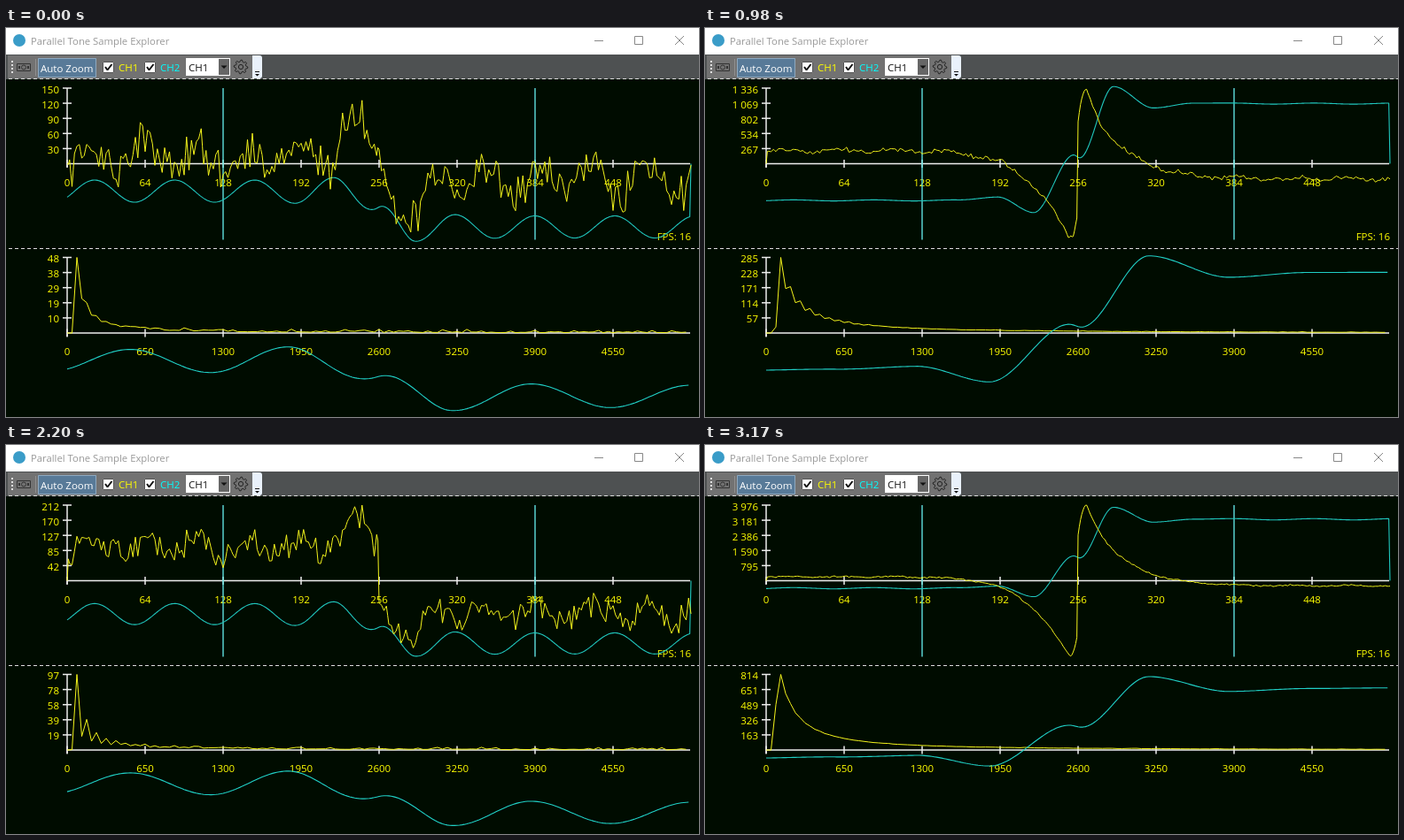
These frames come from a looping animation (782x440 px, 3270 ms). An HTML page with a canvas:

```html
<!DOCTYPE html>
<html lang="en">
<head>
<meta charset="utf-8">
<title>Parallel Tone Sample Explorer</title>
<style>
html, body { margin: 0; width: 100%; height: 100%; overflow: hidden; background: #000c00; }
canvas { display: block; }
</style>
</head>
<body>
<canvas id="view" width="782" height="440"></canvas>
<script>
const g = document.getElementById('view').getContext('2d');
const LOOP = 3270, COUNT = 34, LEFT = 69, MID = 153.5, LOW = 345, HALF = 85.5;

// before, after: channel 1 offsets of both halves; pulse: share of the transient.
// low, high, sway: channel 2 levels and ripple. first, rise, zig: shape of the spectrum.
const STATES = [
  { t: 0, max: 150, peak: 48, before: -6, after: 18, pulse: 0, low: 184.5, high: 225, sway: 12.5, first: 2, rise: 0, zig: .25 },
  { t: 400, max: 377, peak: 214.3, before: -45, after: 47, pulse: 0, low: 215, high: 231, sway: -8, first: 2, rise: 0, zig: .8 },
  { t: 980, max: 1336, peak: 285.5, before: -15, after: 15, pulse: 1, low: 195, high: 85.5, sway: .6, first: 3, rise: .08, zig: .25 },
  { t: 1740, max: 5514, peak: 1133.5, before: -2, after: 1, pulse: 1, low: 160, high: 83, sway: .4, first: 3, rise: .7, zig: 0 },
  { t: 2200, max: 207, peak: 95.5, before: -39, after: 36, pulse: 0, low: 191.5, high: 225.5, sway: 12, first: 2, rise: 0, zig: .75 },
  { t: 2500, max: 1556, peak: 290, before: 6, after: -5, pulse: 1, low: 224, high: 105, sway: 16, first: 2, rise: 0, zig: .05 },
  { t: 3170, max: 3976, peak: 814.3, before: -4.5, after: 4, pulse: 1, low: 162, high: 84, sway: .7, first: 3, rise: .6, zig: .03 }
];

// x, level pairs of the filtered step, 0 = low, 1 = high
const STEP = [285, 0, 330, .04, 371, -.13, 416, .47, 423, .44, 461, 1.18, 506, .95, 551, 1.01, 600, 1];

const clamp = (v, a, b) => Math.max(a, Math.min(b, v));
const mix = (a, b, k) => a + (b - a) * k;
const smooth = k => k * k * (3 - 2 * k);
const px = n => LEFT + n * 1.375;
const bell = d => Math.exp(-d * d / 2);
const wave = (x, peak, period) => Math.cos(2 * Math.PI * (x - peak) / period);
const stepTime = i => Math.round(i * 9.61) * 10 + (i === 1 ? 10 : 0);

function random(seed) {
  let s = seed * 7919 + 12345;
  return () => {
    s = (s + 0x6D2B79F5) | 0;
    let t = Math.imul(s ^ (s >>> 15), 1 | s);
    t = (t + Math.imul(t ^ (t >>> 7), 61 | t)) ^ t;
    return ((t ^ (t >>> 14)) >>> 0) / 4294967296;
  };
}

function stateAt(t) {
  let i = STATES.length - 1;
  while (STATES[i].t > t) i--;
  const a = STATES[i], b = STATES[i + 1] || a, s = {};
  const k = a === b ? 0 : 1 - Math.pow(1 - (t - a.t) / (b.t - a.t), 3);
  for (const key in a) s[key] = mix(a[key], b[key], k);
  for (const key of ['max', 'peak']) s[key] = a[key] * Math.pow(b[key] / a[key], k);
  return s;
}

function pulse(n) {
  const d = n < 256 ? 249.5 - n : n - 263;
  if (d < 0) return (n < 256 ? 1 : -1) * (1 - .33 * d * d / 42);
  return n < 256 ? Math.exp(-Math.pow(d / 33, 1.25)) : .02 - 1.02 * Math.exp(-d / 28);
}

function channel1(s, n) {
  const x = px(n), side = n < 256 ? -1 : 1;
  const hump = bell((x - (side < 0 ? 394 : 451)) / 15);
  const ripple = 2100 / s.max * (side * wave(x, 94, 60) + 3 * side * hump);
  return MID + (side < 0 ? s.before : s.after) + ripple
    + s.pulse * (HALF - s.before) * pulse(n);
}

function channel2(s, x) {
  let i = 2;
  while (i < STEP.length - 2 && x > STEP[i]) i += 2;
  const k = clamp((x - STEP[i - 2]) / (STEP[i] - STEP[i - 2]), 0, 1);
  const level = mix(STEP[i - 1], STEP[i + 1], smooth(k));
  return mix(s.low, s.high, level) + s.sway * wave(x, 100, 90.3) * Math.tanh((x - 421) / 46);
}

function spectrum(s, i) {
  const d = i - Math.round(s.first);
  if (d < 0) return d === -1 ? s.rise * HALF : 0;
  const dent = d % 2 ? 1 - s.zig * Math.exp(-d / 15) : 1;
  return HALF * dent * Math.pow(1 + d / (2.4 + 2.8 * s.pulse), -1.5);
}

function rect(x, y, w, h, color) {
  g.fillStyle = color;
  g.fillRect(x, y, w, h);
}

function box(x, y, w, h, color) {
  g.strokeStyle = color;
  g.lineWidth = 1;
  g.strokeRect(x + .5, y + .5, w - 1, h - 1);
}

function line(pts, color, width = 1) {
  g.beginPath();
  for (let i = 0; i < pts.length; i += 2) g.lineTo(pts[i], pts[i + 1]);
  g.strokeStyle = color;
  g.lineWidth = width;
  g.lineJoin = 'bevel';
  g.stroke();
}

function plot(count, color, width, point) {
  const pts = [];
  for (let i = 0; i < count; i++) pts.push(...point(i));
  line(pts, color, width);
}

function disc(x, y, r, color, hollow) {
  g.beginPath();
  g.arc(x, y, r, 0, 7);
  g.fillStyle = g.strokeStyle = color;
  g.lineWidth = 1;
  hollow ? g.stroke() : g.fill();
}

function text(s, x, y, color, align = 'left', font = '500 11.5px') {
  g.font = font + ' "Open Sans", "Noto Sans", sans-serif';
  g.textAlign = align;
  g.fillStyle = color;
  g.fillText(s, x, y);
}

function triangle(x, y, r) {
  g.beginPath();
  g.moveTo(x - r, y);
  g.lineTo(x + r, y);
  g.lineTo(x, y + r);
  g.fillStyle = '#111';
  g.fill();
}

function titleBar() {
  rect(0, 0, 782, 30, '#fff');
  disc(15, 14, 7, '#3a9cc8');
  text('Parallel Tone Sample Explorer', 28, 19, '#999', 'left', '11.3px');
  line([664, 14.5, 674, 14.5], '#888');
  box(709, 9, 10, 10, '#888');
  line([755, 9, 765, 19], '#888');
  line([765, 9, 755, 19], '#888');
}

function checkBox(x, label, color) {
  rect(x, 38, 13, 13, '#fff');
  box(x, 38, 13, 13, '#555');
  line([x + 3, 44, x + 5.5, 47.5, x + 10.5, 41], '#111', 2);
  text(label, x + 18, 49, color);
}

function toolBar() {
  rect(0, 30, 782, 28, '#4e5152');
  rect(2, 31, 277, 26, '#727272');
  for (let y = 37; y < 52; y += 4) rect(6, y, 2, 2, '#ddd');
  box(12, 40, 16, 9, '#333');
  disc(20, 44.5, 2.5, '#333', true);
  rect(14, 43, 2, 3, '#333');
  rect(24, 43, 2, 3, '#333');
  rect(33, 35, 1, 19, '#909090');
  rect(36, 34, 66, 22, '#587a98');
  box(36, 34, 66, 22, '#8fa9bf');
  text('Auto Zoom', 39, 49.5, '#fff');
  checkBox(109, 'CH1', '#ff0');
  checkBox(156, 'CH2', '#0ff');
  rect(203, 34, 50, 20, '#fff');
  rect(240, 35, 12, 18, '#666');
  text('CH1', 206, 49, '#111');
  triangle(246, 42.5, 3.5);
  disc(265, 44, 2.6, '#222', true);
  plot(33, '#222', 1, i => {
    const a = i * Math.PI / 16, r = i % 4 < 2 ? 7.8 : 5.8;
    return [265 + r * Math.cos(a), 44 + r * Math.sin(a)];
  });
  g.beginPath();
  g.roundRect(278, 31, 11, 26, [0, 3, 3, 0]);
  g.fillStyle = '#e9f1fb';
  g.fill();
  rect(281, 49, 5, 1, '#111');
  triangle(283.5, 52, 2.5);
}

function axes(zero, max, unit, textY, shift) {
  line([LEFT, zero - HALF, LEFT, zero + 4], '#eee', 1.5);
  line([LEFT, zero, 772, zero], '#eee', 1.5);
  for (let i = 0; i < 8; i++) {
    const x = LEFT + 88 * i;
    line([x, zero - 4.5, x, zero + 4.5], '#eee', 1.5);
    text(String(unit * i), x, textY, '#ff0', 'center');
  }
  for (let i = 1; i <= 5; i++) {
    const y = zero - HALF * i / 5;
    line([64, y, 74, y], '#eee', 1.5);
    const label = String(Math.round(max * i / 5)).replace(/(\d)(\d{3})$/, '$1 $2');
    text(label, 60, y + shift, '#ff0', 'right');
  }
}

function dashes(y) {
  g.setLineDash([4, 3]);
  line([3, y, 782, y], '#ddd');
  g.setLineDash([]);
}

function draw(step) {
  const s = stateAt(stepTime(step)), rnd = random(step + 1);
  const jitter = 4500 / s.max;

  rect(0, 0, 782, 440, '#000c00');
  titleBar();
  toolBar();
  dashes(57.5);
  dashes(249.5);

  axes(MID, s.max, 64, 179, 6);
  axes(LOW, s.peak, 650, 370, 5.5);
  text('FPS: 16', 773, 240, '#ff0', 'right');
  for (const n of [128, 384]) line([px(n), 68, px(n), 239.5], '#5fe0de', 1.4);

  plot(513, '#20c8be', 1.1, n => [px(n), n === 512 ? MID : channel2(s, px(n))]);

  // noise changes every second sample, which keeps the trace from looking dense
  let from = 0, to = 0;
  plot(513, '#f4f41c', 1, n => {
    if (n % 2 === 0) [from, to] = [to, (rnd() + rnd() - 1) * jitter];
    const y = channel1(s, n) + (n % 2 ? (from + to) / 2 : from);
    return [px(n), n === 0 ? MID : clamp(y, 68, 239)];
  });

  const hiss = .4 + jitter * .12;
  plot(128, '#f4f41c', 1, i =>
    [LEFT + i * 5.5, LOW - Math.min(HALF, spectrum(s, i) + (i > 8 ? rnd() * rnd() * hiss : 0))]);
  plot(256, '#20d0c6', 1.1, n => [LEFT + n * 2.75, channel2(s, px(128 + n)) + LOW - MID]);
}

let shown = -1;
function tick() {
  const t = performance.now() % LOOP;
  let step = COUNT - 1;
  while (stepTime(step) > t) step--;
  if (step !== shown) draw(shown = step);
  requestAnimationFrame(tick);
}
tick();
</script>
</body>
</html>
```
